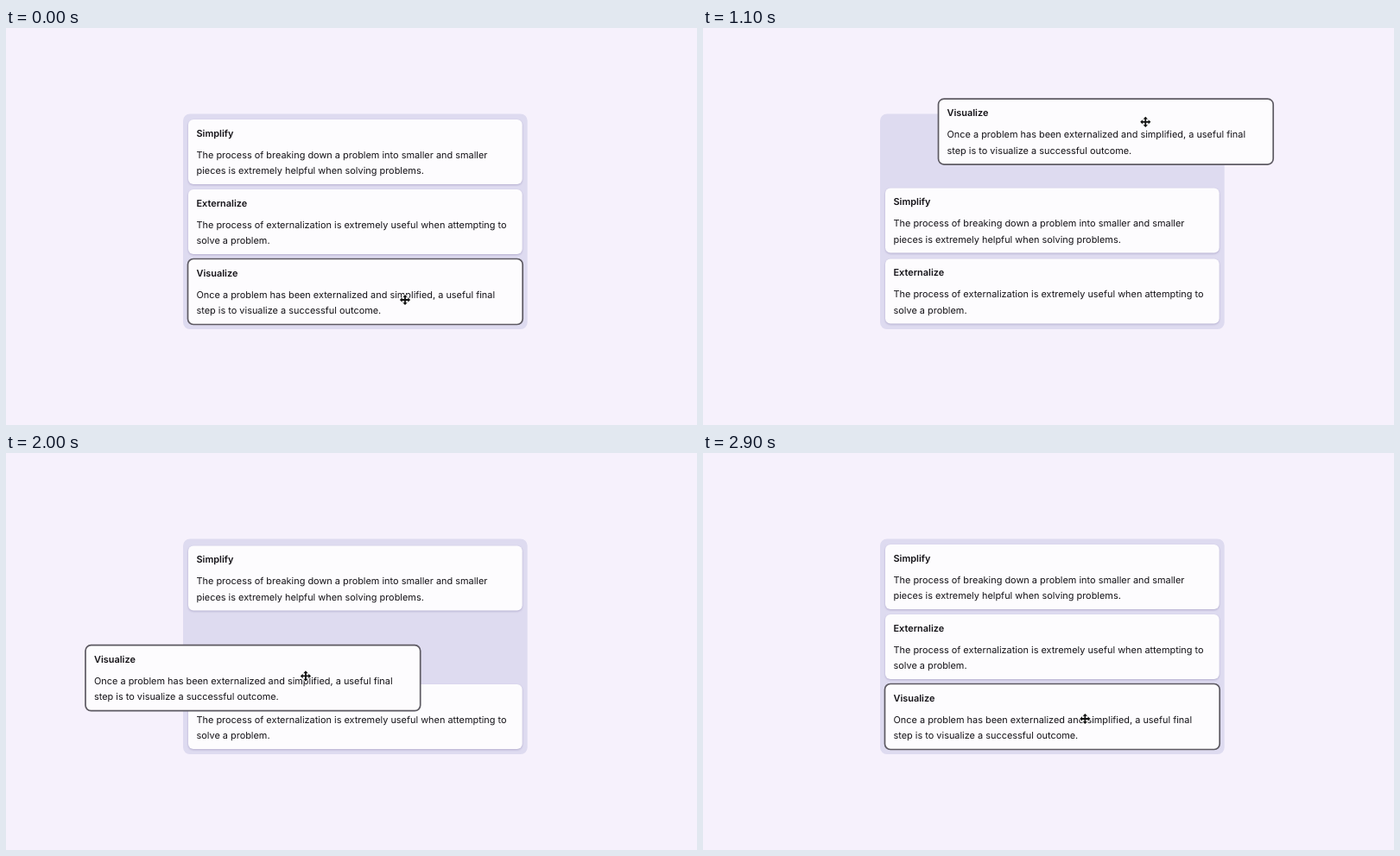
These frames come from a looping animation (800x460 px, 3 s). An HTML page:

```html
<!DOCTYPE html>
<html lang="en">
<head>
<meta charset="utf-8">
<title>Sortable cards</title>
<style>
html, body { margin: 0; width: 100%; height: 100%; overflow: hidden; background: #f6f1fc; }
svg { display: block; width: 800px; height: 460px; }
text { font-family: Inter, sans-serif; font-size: 10.92px; fill: #141217; text-rendering: geometricPrecision; white-space: pre; }
.title { font-weight: 600; }
.card { fill: #fdfcfe; filter: drop-shadow(0 1px 1.2px rgba(70, 55, 120, .28)); }
.held { fill: #fdfcfe; stroke: #5d5a62; stroke-width: 1.7; }
</style>
</head>
<body>
<svg viewBox="0 0 800 460" xmlns="http://www.w3.org/2000/svg">
  <rect width="800" height="460" fill="#f6f1fc"/>
  <rect x="205" y="99.5" width="398.7" height="249.5" rx="8" fill="#dedbf0"/>
  <g id="cards"></g>
  <path id="cursor" d="M0-6.1L2.7-3.3H.9V-.9H3.3V-2.7L6.1 0L3.3 2.7V.9H.9V3.3H2.7L0 6.1L-2.7 3.3H-.9V.9H-3.3V2.7L-6.1 0L-3.3-2.7V-.9H-.9V-3.3H-2.7Z"
    fill="#111" stroke="#fff" stroke-width="1.6" stroke-linejoin="round" paint-order="stroke"/>
</svg>
<script>
const LOOP = 3000, STEP = 100, LEFT = 211, TOP = 106, GAP = 81;
const GRAB = 300, DROP = 2500;
const NS = "http://www.w3.org/2000/svg";

// Turning points of the drag: time and offset from the home slot
const drag = [
  { t: GRAB, x: 0, y: 0 },
  { t: 600, x: 80.5, y: -12 },
  { t: 700, x: 104, y: -64 },
  { t: 1100, x: 62, y: -185.4 },
  { t: 1300, x: 5, y: -186 },
  { t: 1500, x: -11.5, y: -182 },
  { t: 1900, x: -119.5, y: -66 },
  { t: 2000, x: -118.5, y: -44.8 },
  { t: 2400, x: -74, y: 18.6 },
  { t: DROP, x: -60, y: 22 }
];
const home = { x: 0, y: 0 };
const dropped = drag[drag.length - 1];

// Pointer offsets from the point where it holds the card
const hold = { x: 461.5, y: 296.5 };
const before = { x: 0.5, y: 18.5 };
const after = { x: -19.2, y: 11.5 };

function make(parent, tag, attrs, text) {
  const el = parent.appendChild(document.createElementNS(NS, tag));
  for (const key in attrs) el.setAttribute(key, attrs[key]);
  if (text) el.textContent = text;
  return el;
}

function makeCard(title, lines, held) {
  const g = make(document.getElementById("cards"), "g", {});
  make(g, "rect", held
    ? { class: "held", x: -0.5, y: -0.5, width: 387.7, height: 76, rx: 6.5 }
    : { class: "card", width: 386.7, height: 75, rx: 6 });
  make(g, "text", { class: "title", x: 9.5, y: 19.5 }, title);
  lines.forEach((line, i) => make(g, "text", { x: 9.5, y: 44.5 + i * 18.7 }, line));
  return g;
}

const simplify = makeCard("Simplify", [
  "The process of breaking down a problem into smaller and smaller",
  "pieces is extremely helpful when solving problems."]);
const externalize = makeCard("Externalize", [
  "The process of externalization is extremely useful when attempting to",
  "solve a problem."]);
const visualize = makeCard("Visualize", [
  "Once a problem has been externalized and simplified, a useful final",
  "step is to visualize a successful outcome."], true);
const cursor = document.getElementById("cursor");

const progress = (t, from, to) => Math.min(Math.max((t - from) / (to - from), 0), 1);
const easeOut = u => 1 - (1 - u) ** 3;
const mix = (a, b, u) => ({ x: a.x + (b.x - a.x) * u, y: a.y + (b.y - a.y) * u });

// Smooth curve through timed points
function along(path, t) {
  if (t <= path[0].t) return path[0];
  const i = path.findIndex(p => p.t >= t) - 1;
  const a = path[i], b = path[i + 1], span = b.t - a.t, u = (t - a.t) / span;
  const slope = (j, axis) => {
    const p = path[Math.max(j - 1, 0)], q = path[Math.min(j + 1, path.length - 1)];
    return (q[axis] - p[axis]) / (q.t - p.t) * span;
  };
  const at = axis =>
    a[axis] * (1 + 2 * u) * (1 - u) ** 2 + b[axis] * u * u * (3 - 2 * u) +
    slope(i, axis) * u * (1 - u) ** 2 - slope(i + 1, axis) * u * u * (1 - u);
  return { x: at("x"), y: at("y") };
}

function heldAt(t) {
  if (t <= DROP) return along(drag, t);
  return mix(dropped, home, easeOut(progress(t, DROP, 2900)));
}

// The pointer runs a little ahead of the card it drags
function pointerAt(t) {
  if (t < GRAB) return mix(before, home, progress(t, 100, GRAB));
  if (t < DROP) return mix(heldAt(t), heldAt(t + STEP), 0.4);
  return mix(dropped, after, easeOut(progress(t, DROP, 2900)));
}

// A neighbour slides down one slot, later back up
const settle = (t, start) => t < start ? 0 : 1 - Math.exp((start - t) / 80);
const shift = (t, down, up) => GAP * (settle(t, down) - settle(t, up));

const place = (el, x, y) => el.setAttribute("transform", `translate(${x.toFixed(2)} ${y.toFixed(2)})`);

function render(time) {
  const t = Math.floor((time % LOOP) / STEP) * STEP;
  const card = heldAt(t), pointer = pointerAt(t);
  place(simplify, LEFT, TOP + shift(t, 780, 1680));
  place(externalize, LEFT, TOP + GAP + shift(t, 680, 2000));
  place(visualize, LEFT + card.x, TOP + 2 * GAP + card.y);
  place(cursor, hold.x + pointer.x, hold.y + pointer.y);
}

const start = performance.now();
function tick() {
  render(performance.now() - start);
  requestAnimationFrame(tick);
}
tick();
</script>
</body>
</html>
```
